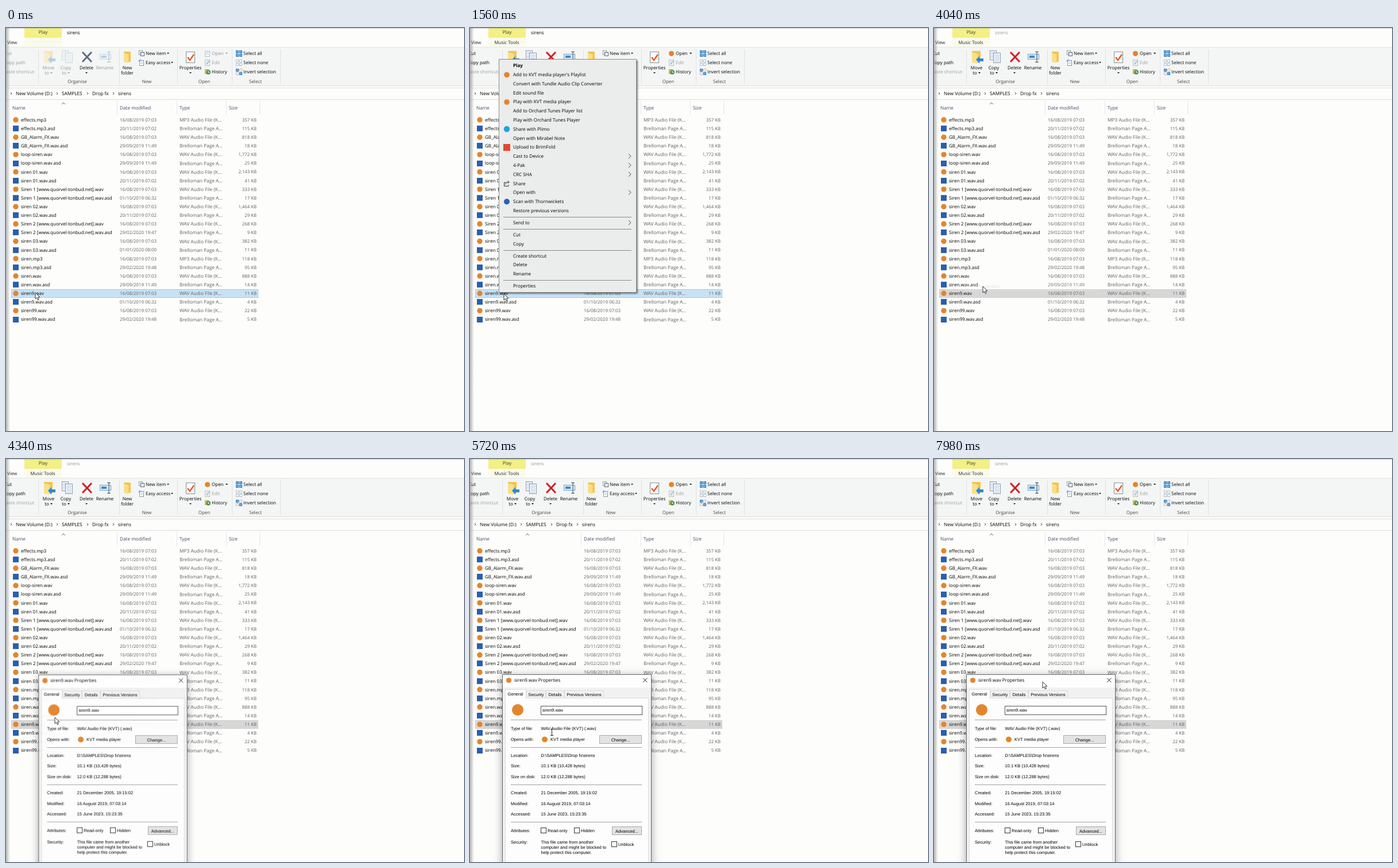
Animation, 797 px wide and 702 px high, one loop 8 s. Source, as an HTML page with a canvas:

```html
<!DOCTYPE html>
<html lang="en">
<head>
<meta charset="utf-8">
<title>File properties</title>
<style>
html, body { margin: 0; width: 100%; height: 100%; overflow: hidden; background: #fdfdfc; }
canvas { display: block; }
</style>
</head>
<body>
<canvas id="stage" width="797" height="702"></canvas>
<script>
const stage = document.getElementById('stage').getContext('2d');
const layer = document.createElement('canvas').getContext('2d');
layer.canvas.width = 797;
layer.canvas.height = 702;
let ctx = stage;
const LOOP = 8000;
const UI = '"Open Sans", "Noto Sans", sans-serif';
const DLG = '"Liberation Sans", Arial, sans-serif';
const INK = '#000', GREY = '#5f5f5f', PALE = '#9b9d9e';
const ORANGE = '#e5842b', BLUE = '#2b5fae';

const SITE = '[www.quorvel-tonbud.net]';
const FILES = [
  'effects.mp3|16/08/2019 07:03|357', 'effects.mp3.asd|20/11/2019 07:02|115',
  'GB_Alarm_FX.wav|16/08/2019 07:03|818', 'GB_Alarm_FX.wav.asd|29/09/2019 11:49|18',
  'loop-siren.wav|16/08/2019 07:03|1,772', 'loop-siren.wav.asd|29/09/2019 11:49|25',
  'siren 01.wav|16/08/2019 07:03|2,143', 'siren 01.wav.asd|20/11/2019 07:02|41',
  `Siren 1 ${SITE}.wav|16/08/2019 07:03|333`, `Siren 1 ${SITE}.wav.asd|01/10/2019 06:32|17`,
  'siren 02.wav|16/08/2019 07:03|1,464', 'siren 02.wav.asd|20/11/2019 07:02|29',
  `Siren 2 ${SITE}.wav|16/08/2019 07:03|268`, `Siren 2 ${SITE}.wav.asd|29/02/2020 19:47|9`,
  'siren 03.wav|16/08/2019 07:03|382', 'siren 03.wav.asd|01/01/2020 08:00|11',
  'siren.mp3|16/08/2019 07:03|118', 'siren.mp3.asd|29/02/2020 19:48|95',
  'siren.wav|16/08/2019 07:03|888', 'siren.wav.asd|29/09/2019 11:49|14',
  'siren9.wav|16/08/2019 07:03|11', 'siren9.wav.asd|01/10/2019 06:32|4',
  'siren99.wav|16/08/2019 07:03|22', 'siren99.wav.asd|29/02/2020 19:48|5'
].map(s => s.split('|'));

// '-' is a separator, '>' marks a submenu
const MENU = ['Play', "Add to KVT media player's Playlist", 'Convert with Tundle Audio Clip Converter',
  'Edit sound file', 'Play with KVT media player', 'Add to Orchard Tunes Player list',
  'Play with Orchard Tunes Player', 'Share with Plimo', 'Open with Mirabel Note',
  'Upload to BrimFold', 'Cast to Device>', '4-Pak>', 'CRC SHA>', 'Share', 'Open with>',
  'Scan with Thornwickets', 'Restore previous versions', '-', 'Send to>', '-', 'Cut', 'Copy', '-',
  'Create shortcut', 'Delete', 'Rename', '-', 'Properties'];

const PATH = [[0, 51, 461], [560, 51, 461], [1080, 59, 463], [2500, 59, 463], [2540, 80, 459],
  [2800, 80, 459], [2940, 85, 450], [5320, 85, 450], [5720, 142, 475], [6040, 252, 668],
  [6140, 250, 667], [6300, 250, 667], [6660, 200, 425], [7020, 253, 668], [7120, 253, 668],
  [7860, 187, 390], [7980, 189, 388], [LOOP, 189, 388]];

const ramp = (t, a, b) => Math.min(1, Math.max(0, (t - a) / (b - a)));
const mix = (a, b, k) => `rgb(${a.map((v, i) => Math.round(v + (b[i] - v) * k))})`;

function text(s, x, y, { size = 8, color = INK, align = 'left', font = UI, weight = '' } = {}) {
  ctx.font = `${weight} ${size}px ${font}`;
  ctx.fillStyle = color;
  ctx.textAlign = align;
  ctx.fillText(s, x, y + size * 0.36);
}
function rect(x, y, w, h, fill, stroke) {
  if (fill) { ctx.fillStyle = fill; ctx.fillRect(x, y, w, h); }
  if (stroke) {
    ctx.strokeStyle = stroke;
    ctx.lineWidth = 1;
    ctx.strokeRect(x + 0.5, y + 0.5, w - 1, h - 1);
  }
}
function line(pts, color, width = 1) {
  ctx.beginPath();
  for (let i = 0; i < pts.length; i += 2) ctx.lineTo(pts[i], pts[i + 1]);
  ctx.strokeStyle = color;
  ctx.lineWidth = width;
  ctx.stroke();
}
function poly(pts, fill) {
  ctx.beginPath();
  for (let i = 0; i < pts.length; i += 2) ctx.lineTo(pts[i], pts[i + 1]);
  ctx.closePath();
  ctx.fillStyle = fill;
  ctx.fill();
}
function dot(x, y, r, color) {
  ctx.beginPath();
  ctx.arc(x, y, r, 0, 7);
  ctx.fillStyle = color;
  ctx.fill();
}
// draws a group on its own layer, so that it fades as one picture
function fade(alpha, draw, scale = 1, cx = 0, cy = 0) {
  layer.clearRect(0, 0, 797, 702);
  ctx = layer;
  draw();
  ctx = stage;
  ctx.save();
  ctx.globalAlpha = alpha;
  ctx.translate(cx, cy);
  ctx.scale(scale, scale);
  ctx.drawImage(layer.canvas, -cx, -cy);
  ctx.restore();
}
function shadowBox(x, y, w, h, fill, edge, [blur, dx, dy, strength]) {
  ctx.save();
  ctx.shadowColor = `rgba(0,0,0,${strength})`;
  ctx.shadowBlur = blur;
  ctx.shadowOffsetX = dx;
  ctx.shadowOffsetY = dy;
  rect(x, y, w, h, fill);
  ctx.restore();
  rect(x, y, w, h, null, edge);
}
const drop = (x, y, color = '#222') => poly([x - 2, y - 1, x + 2, y - 1, x, y + 1.5], color);
const chevron = (x, y, s, color) => line([x - s / 2, y - s, x + s / 2, y, x - s / 2, y + s], color);

function page(x, y, w, h, edge = '#8b98a5') {
  rect(x, y, w, h, '#fff', edge);
  for (let i = y + 3; i < y + h - 2; i += 2.5) line([x + 2, i, x + w - 2, i], '#9dbbdc', 0.9);
}
function folder(x, y, w, h) {
  rect(x, y, w, h, '#f2c450');
  poly([x, y + 2, x + w * 0.7, y + 5, x + w * 0.7, y + h + 2, x, y + h], '#fbdf87');
}

function ribbon(k) {
  const live = mix([150, 152, 153], [0, 0, 0], k);
  rect(0, 33, 797, 67, '#f4f6f5');
  line([0, 33.5, 797, 33.5], '#e3e5e5');
  line([0, 100.5, 797, 100.5], '#d7d9d9');
  for (const x of [56, 197, 298, 393, 477]) line([x + 0.5, 37, x + 0.5, 97], '#dfe1e1');

  text('Cut', 10, 44, { align: 'right', color: live });
  text('Copy path', 34, 60, { align: 'right', color: live });
  text('Paste shortcut', 49, 76, { align: 'right', color: PALE });

  const mid = (s, x, y, color = INK) => text(s, x, y, { align: 'center', color });
  fade(0.35 + 0.65 * k, () => {
    folder(66, 40, 15, 20);
    poly([73, 55, 79, 49, 79, 53, 86, 53, 86, 58, 79, 58, 79, 62], '#2f86d6');
    page(97, 39, 12, 17);
    page(103, 43, 13, 18);
    rect(163, 45, 20, 10, '#dcebf8', '#6f9fca');
    rect(166, 48, 9, 4, '#3d88cc');
    line([176, 41.5, 182, 41.5], '#444');
    line([179, 41, 179, 59], '#444');
    line([176, 59.5, 182, 59.5], '#444');
  });
  const red = mix([96, 107, 125], [212, 28, 34], k);
  line([133, 42, 149, 59], red, 3);
  line([149, 42, 133, 59], red, 3);
  mid('Move', 74, 69, live); mid('to', 71, 78, live); drop(79, 78, live);
  mid('Copy', 104, 69, live); mid('to', 101, 78, live); drop(109, 78, live);
  mid('Delete', 140, 69); drop(140, 78);
  mid('Rename', 172, 69, live);
  folder(205, 41, 12, 18);
  mid('New', 211, 69); mid('folder', 211, 78);

  page(231, 39, 7, 8);
  rect(234, 42, 7, 7, '#f4f8fb', '#55697d');
  text('New item', 243, 44); drop(282, 44);
  page(232, 56, 8, 10);
  line([231, 58, 234, 55], '#3d88cc', 1.5);
  text('Easy access', 243, 60); drop(289, 60);

  rect(313, 41, 16, 20, '#fff', '#8c8c8c');
  line([316, 51, 320, 56, 327, 46], '#e2581e', 2.4);
  mid('Properties', 321, 69); drop(321, 78);
  fade(1 - k, () => page(346, 40, 9, 10, '#b5bcc2'));
  fade(k, () => dot(350.5, 44.5, 4.5, ORANGE));
  text('Open', 358, 44, { color: live }); drop(384, 44, live);
  page(346, 55, 9, 11, '#b5bcc2');
  line([349, 63, 355, 56], '#a9bccd', 1.5);
  text('Edit', 358, 60, { color: PALE });
  rect(346, 72, 7, 8, '#f6d46f', '#c49a34');
  dot(352, 77, 4, '#4c9a54');
  line([352, 74.5, 352, 77.5, 354, 77.5], '#fff');
  text('History', 358, 76);

  for (let i = 0; i < 4; i++) {
    const x = 400 + (i % 2) * 6, y = 39 + (i >> 1) * 6;
    rect(x, y, 5, 5, '#6fb4ea', '#2a76b8');
    rect(x, y + 16, 5, 5, '#fff', '#b6bcc1');
    const on = i === 0 || i === 3;
    rect(x, y + 32, 5, 5, on ? '#6fb4ea' : '#fff', on ? '#2a76b8' : '#b6bcc1');
  }
  text('Select all', 413, 44);
  text('Select none', 413, 60);
  text('Invert selection', 413, 76);
  mid('Organise', 124, 93, '#444'); mid('New', 245, 93, '#444');
  mid('Open', 345, 93, '#444'); mid('Select', 434, 93, '#444');
}

function explorer(k, inactive) {
  rect(0, 0, 797, 702, '#fdfdfb');
  rect(32, 17, 65, 16, '#fafaec');
  rect(32, 0, 65, 17, '#f4f083');
  text('Play', 64.5, 7, { align: 'center', color: '#333' });
  text('sirens', 106, 8, { size: 8.2, color: inactive ? '#999' : INK });
  text('View', 2, 25, { color: '#222' });
  fade(k, () => text('Music Tools', 64, 25, { align: 'center', color: '#222' }));
  ribbon(k);

  line([0, 104.5, 797, 104.5], '#dcdcdc');
  line([0, 124.5, 797, 124.5], '#dcdcdc');
  [['New Volume (D:)', 17], ['SAMPLES', 97], ['Drop fx', 150], ['sirens', 195]].forEach(([s, x]) => {
    chevron(x - 8, 114, 2, '#444');
    text(s, x, 114, { size: 8.25 });
  });
  [['Name', 11], ['Date modified', 198], ['Type', 302], ['Size', 388]].forEach(([s, x]) =>
    text(s, x, 139, { size: 8.2, color: '#3f4d62' }));
  for (const x of [193, 297, 383, 441]) line([x + 0.5, 127, x + 0.5, 151], '#e6e6e6');
  line([97, 133, 100, 130, 103, 133], '#666');

  FILES.forEach(([name, date, size], i) => {
    const y = 160 + i * 15.11;
    if (i === 20) rect(9, 455, 430, 15, inactive ? '#d7d7d7' : '#c6e2f6', inactive ? '#d0d0d0' : '#9dcdee');
    const side = name.endsWith('.asd');
    if (side) rect(12, Math.round(y - 5), 10, 10, BLUE);
    else dot(17, y, 4.7, ORANGE);
    text(name, 26, y, { size: 8.05 });
    text(date, 198, y, { size: 7.9, color: GREY });
    const type = side ? 'Brelloman Page A...' : (name.endsWith('mp3') ? 'MP3' : 'WAV') + ' Audio File (K...';
    text(type, 302, y, { size: 8.3, color: GREY });
    text(size + ' KB', 436, y, { size: 7.8, color: GREY, align: 'right' });
  });

  const side = ctx.createLinearGradient(0, 0, 7, 0);
  side.addColorStop(0, 'rgba(110,110,110,.5)');
  side.addColorStop(1, 'rgba(110,110,110,0)');
  rect(0, 0, 7, 702, side);
  rect(0, 0, 797, 1, 'rgba(120,120,120,.4)');
}

function menu(hover) {
  shadowBox(50, 54, 240, 407, '#ebecec', '#8c8c8c', [3, 1.5, 1.5, 0.6]);
  if (hover) rect(52, 442, 236, 16, '#fdfdfd');
  let y = 65.3;
  MENU.forEach((item, i) => {
    if (item === '-') {
      line([58, Math.round(y - 5) + 0.5, 281, Math.round(y - 5) + 0.5], '#8a8a8a');
      y += 5.1;
      return;
    }
    if (item.endsWith('>')) chevron(278, y, 4, '#444');
    text(item.replace('>', ''), 75, y, { size: i ? 8.1 : 8, weight: i ? '' : 'bold' });
    y += 15.8;
  });
  dot(64, 81.5, 4.8, ORANGE);
  dot(64, 129, 4.8, ORANGE);
  dot(64, 176, 5.2, '#18a5e0');
  rect(58, 202, 12, 12, '#e2492f');
  line([62, 269, 59.5, 269, 59.5, 275.5, 67, 275.5, 67, 273], '#333');
  line([61.5, 273, 63, 269, 68, 268.5], '#333');
  line([65.5, 266, 68, 268.5, 65.5, 271], '#333');
  dot(64, 302.5, 5, '#2463b8');
}

function dialog() {
  const say = (s, x, y, more) => text(s, x, y, { size: 7.55, font: DLG, ...more });
  const button = (s, x, y, w) => {
    rect(x, y, w, 15, '#e3e3e3', '#a9a9a9');
    say(s, x + w / 2, y + 8, { align: 'center' });
  };
  const check = (s, x, y) => {
    rect(x, y - 5, 10, 10, '#fff', '#333');
    say(s, x + 12, y);
  };
  shadowBox(56, 375, 260, 345, '#f1f1f1', '#666', [14, 0, 3, 0.35]);
  rect(57, 376, 258, 22, '#fefefe');
  dot(67.5, 385.5, 4.5, ORANGE);
  text('siren9.wav Properties', 77, 385.5);
  line([301, 381.5, 308.5, 389], '#222');
  line([308.5, 381.5, 301, 389], '#222');

  rect(61, 416, 250, 300, '#fdfdfd', '#dcdcdc');
  [['Security', 98, 34], ['Details', 132, 32], ['Previous Versions', 164, 69]].forEach(([s, x, w]) => {
    rect(x, 403, w, 14, '#f1f1f1', '#dcdcdc');
    say(s, x + w / 2, 410, { align: 'center' });
  });
  rect(61, 401, 37, 17, '#fdfdfd');
  line([61.5, 417, 61.5, 401.5, 97.5, 401.5, 97.5, 416], '#dcdcdc');
  say('General', 79, 409, { align: 'center' });

  dot(83, 437, 10, ORANGE);
  rect(123, 430, 177, 16, '#fff', '#555');
  say('siren9.wav', 126, 437.5);
  for (const y of [454, 502, 567, 632]) line([71, y + 0.5, 299, y + 0.5], '#a0a0a0');
  [['Type of file:', 'WAV Audio File (KVT) (.wav)', 469], ['Opens with:', '', 488],
    ['Location:', 'D:\\SAMPLES\\Drop fx\\sirens', 516], ['Size:', '10.1 KB (10,428 bytes)', 534.5],
    ['Size on disk:', '12.0 KB (12,288 bytes)', 553], ['Created:', '21 December 2005, 19:15:02', 581],
    ['Modified:', '16 August 2019, 07:03:14', 600], ['Accessed:', '15 June 2023, 15:23:35', 618.5],
    ['Attributes:', '', 647], ['Security:', 'This file came from another', 667],
    ['', 'computer and might be blocked to', 676], ['', 'help protect this computer.', 685]
  ].forEach(([label, value, y]) => {
    say(label, 71, y);
    say(value, 123.5, y);
  });
  dot(130, 488.5, 5, ORANGE);
  say('KVT media player', 140, 488);
  button('Change...', 225, 481, 74);
  button('Advanced...', 247, 640, 52);
  check('Read-only', 123, 647);
  check('Hidden', 181, 647);
  check('Unblock', 246, 671);
}

function cursor(t) {
  const i = PATH.findIndex((p, n) => n && t < p[0]);
  const [a, b] = [PATH[i - 1], PATH[i]];
  const k = ramp(t, a[0], b[0]);
  const x = a[1] + (b[1] - a[1]) * k, y = a[2] + (b[2] - a[2]) * k;
  const overText = t > 4420 && x > 122 && x < 225 &&
    ((y > 430 && y < 446) || (y > 462 && y < 478) || (y > 508 && y < 560) || (y > 575 && y < 625));
  ctx.save();
  ctx.translate(Math.round(x), Math.round(y));
  if (overText) {
    line([0.5, -5, 0.5, 5], '#222');
    line([-2, -5.5, 3, -5.5], '#222');
    line([-2, 5.5, 3, 5.5], '#222');
  } else {
    const arrow = [0, 0, 0, 11, 2.6, 8.7, 4.4, 12.7, 6.2, 11.9, 4.5, 8, 8, 8, 0, 0];
    poly(arrow, '#fff');
    line(arrow, '#222', 0.9);
  }
  ctx.restore();
}

function draw(t) {
  explorer(ramp(t, 140, 300), t >= 3900);
  if (t >= 1080 && t < 3360) {
    const alpha = 0.45 * ramp(t, 1060, 1140) + 0.55 * ramp(t, 1220, 1280);
    fade(alpha, () => menu(t >= 2540));
  } else if (t >= 3360 && t < 4080) {
    // the chosen item lingers after the menu has closed
    fade(1 - ramp(t, 3360, 4120), () => {
      rect(52, 442, 236, 16, '#fdfdfd');
      text('Properties', 75, 449.6, { size: 8.1 });
    });
  }
  if (t >= 4420) dialog();
  else if (t >= 4200) {
    const k = 1 - (1 - ramp(t, 4180, 4420)) ** 3;
    fade(k, dialog, 0.92 + 0.08 * k, 186, 545);
  }
  cursor(t);
}

stage.textRendering = layer.textRendering = 'geometricPrecision';
const start = performance.now();
function tick() {
  draw((performance.now() - start) % LOOP);
  requestAnimationFrame(tick);
}
tick();
</script>
</body>
</html>
```
